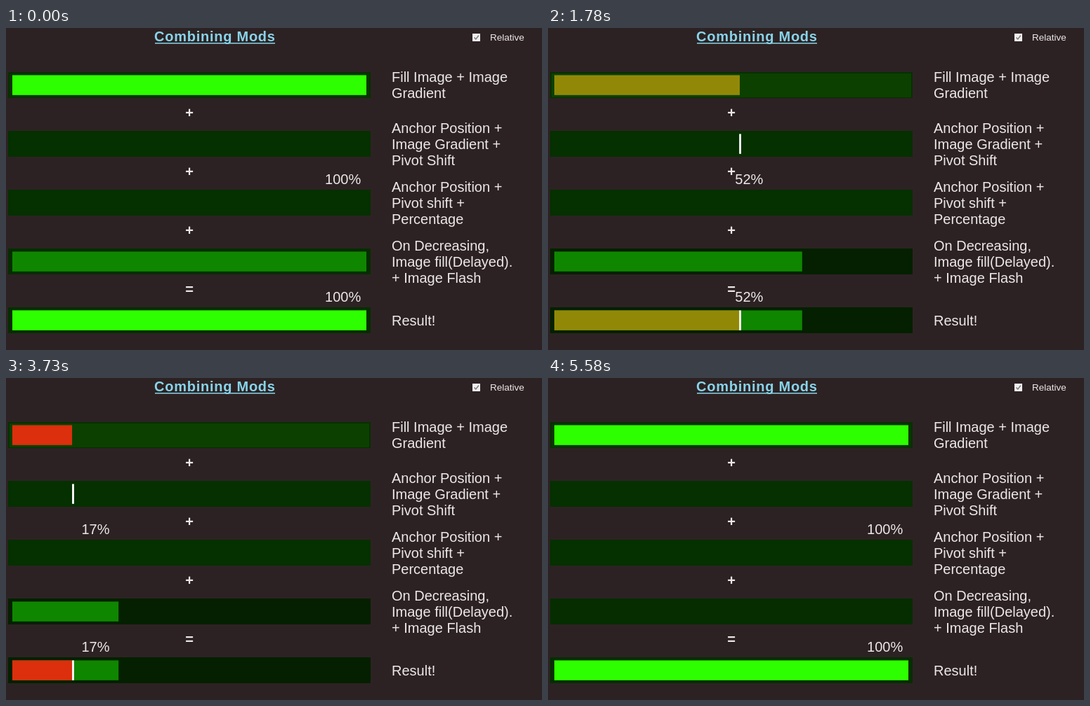
An HTML page with a canvas that plays this animation: 763x460 px, repeating every 5660 ms.

```html
<!DOCTYPE html>
<html lang="en">
<head>
<meta charset="utf-8">
<title>Combining Mods</title>
<style>
  html, body { margin: 0; width: 100%; height: 100%; overflow: hidden; background: #2d2223; }
  canvas { display: block; }
</style>
</head>
<body>
<canvas width="763" height="460"></canvas>
<script>
const ctx = document.querySelector('canvas').getContext('2d');
const LOOP = 5660, TICK = LOOP / 73;
const FONT = '"Liberation Sans", Arial, sans-serif';
const LEFT = 9, WIDTH = 504, ROW = 84;

// [time in ms, value] pairs, linear in between
const HEALTH = [[175, 1], [675, .7], [1563, .7], [2063, .3], [3503, .3], [4003, 0],
                [5118, 0], [5119, .04], [5580, 1]];
const DELAYED = [[1180, 1], [1680, .7], [2577, .7], [3077, .3], [4498, .3], [4998, 0]];
// [start, value being approached]
const TARGETS = [[0, 1], [175, .7], [1563, .3], [3503, 0], [5118, 1]];
const FLASHES = [[175, 1180], [1563, 2577], [3503, 4498]];

const LABELS = [
  [77, 'Fill Image + Image', 'Gradient'],
  [149.5, 'Anchor Position +', 'Image Gradient +', 'Pivot Shift'],
  [233.5, 'Anchor Position +', 'Pivot shift +', 'Percentage'],
  [317.5, 'On Decreasing,', 'Image fill(Delayed).', '+ Image Flash'],
  [424.5, 'Result!']
];

function track(keys, t) {
  const i = keys.findIndex(k => k[0] > t);
  if (i < 0) return keys[keys.length - 1][1];
  if (i === 0) return keys[0][1];
  const [t0, a] = keys[i - 1], [t1, b] = keys[i];
  return a + (b - a) * (t - t0) / (t1 - t0);
}

function rect(x, y, w, h, color) {
  ctx.fillStyle = color;
  ctx.fillRect(x, y, w, h);
}

function text(str, x, y, size = '20px', align = 'left', color = '#ebe8e8') {
  ctx.font = size + ' ' + FONT;
  ctx.textAlign = align;
  ctx.fillStyle = color;
  ctx.fillText(str, x, y);
}

const frame = (row, color) => rect(3, 63 + row * ROW, 516, 37, color);
const fill = (row, p, color) => rect(LEFT, 67.4 + row * ROW, WIDTH * p, 28.4, color);

function marker(row, p, pivot) {
  ctx.globalAlpha = Math.min(1, 10 * Math.min(p, 1 - p));
  rect(LEFT + WIDTH * p - 2.8 * pivot, 67.4 + row * ROW, 2.8, 28.4, '#fff');
  ctx.globalAlpha = 1;
}

function percent(y, p, pivot) {
  text(Math.round(p * 100) + '%', LEFT + WIDTH * p + 33.4 * (1 - 2 * pivot), y, '20px', 'center');
}

function drawStatic() {
  rect(0, 0, 763, 460, '#2d2223');
  ctx.letterSpacing = '0.75px';
  text('Combining Mods', 211, 19, 'bold 20px', 'left', '#87d4ea');
  ctx.letterSpacing = '0px';
  rect(212, 21, 171, 1.5, '#87d4ea');

  rect(664, 8, 11, 11, '#f0eeee');
  ctx.strokeStyle = '#777';
  ctx.lineWidth = 1.4;
  ctx.beginPath();
  ctx.moveTo(666.5, 13.5);
  ctx.lineTo(668.8, 16);
  ctx.lineTo(672.8, 10.8);
  ctx.stroke();
  text('Relative', 689, 17.5, '13.5px');

  for (const [y, ...lines] of LABELS)
    lines.forEach((line, i) => text(line, 549, y + i * 23));
  [...'+++='].forEach((sign, i) => text(sign, 261, 127.5 + i * ROW, 'bold 20px', 'center'));
}

function draw(t) {
  const p = track(HEALTH, t);
  const late = t < 5118 ? track(DELAYED, t) : 0;
  const pivot = TARGETS.filter(k => k[0] <= t).pop()[1];
  const flash = FLASHES.some(([a, b]) => t >= a && t < b);
  const color = `rgb(${255 - 209 * p}, ${5 + 250 * p}, ${16 * (1 - p)})`;
  const back = '#053000', lateBack = flash ? '#042000' : '#052d00';

  drawStatic();

  frame(0, back);
  rect(5, 65, 512, 34, p < 1 ? '#0c4000' : '#083400');
  fill(0, p, color);

  frame(1, back);
  marker(1, p, pivot);

  frame(2, back);
  percent(223, p, pivot);

  frame(3, lateBack);
  fill(3, late, '#0f8600');

  frame(4, lateBack);
  fill(4, late, '#0f8600');
  fill(4, p, color);
  marker(4, p, pivot);
  percent(391, p, pivot);
}

const start = performance.now();
function loop() {
  const t = (performance.now() - start) % LOOP;
  draw(Math.min(72, Math.floor((t + 10) / TICK)) * TICK);
  requestAnimationFrame(loop);
}
loop();
</script>
</body>
</html>
```
